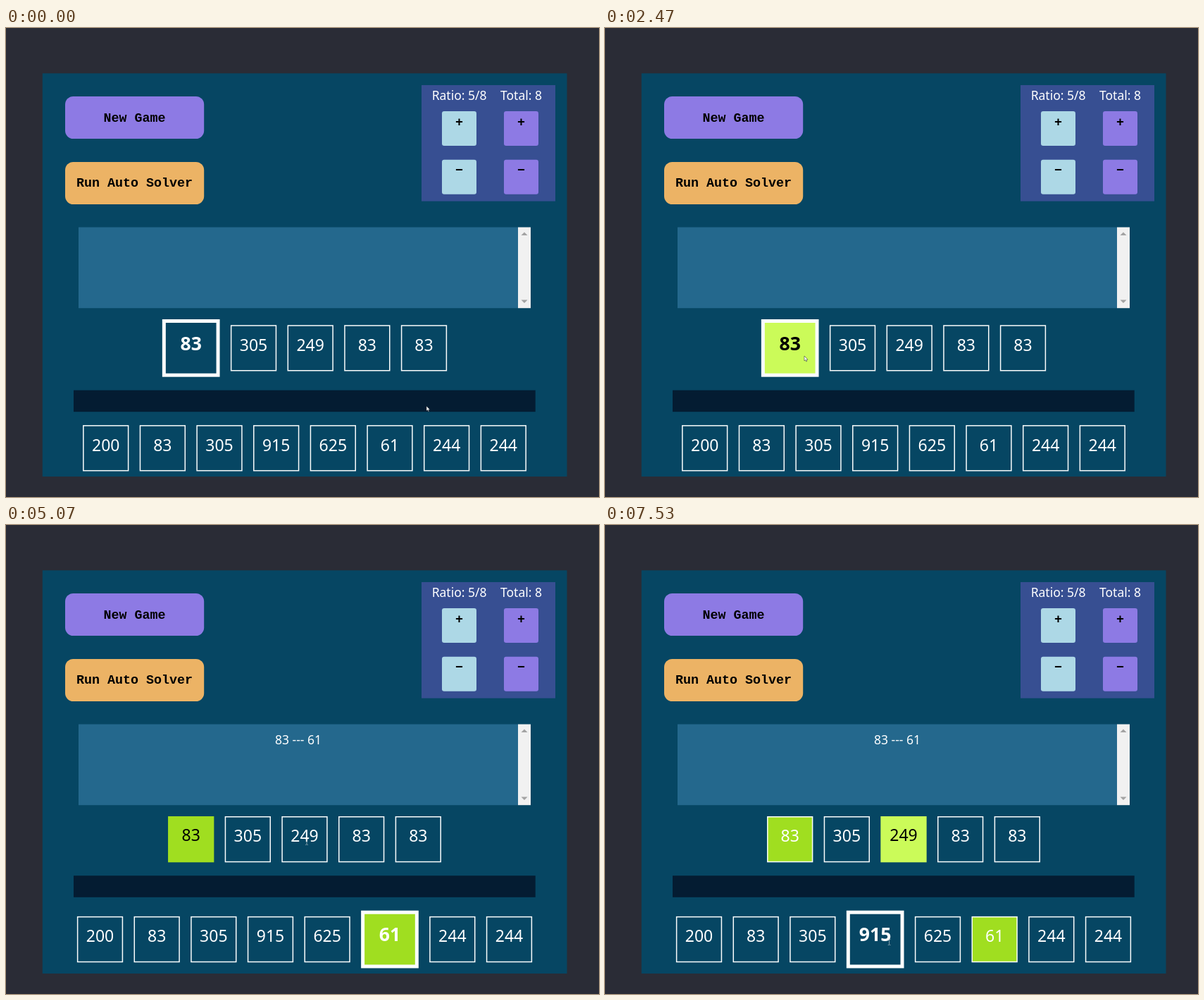
Animation of 842x665 px, one loop 8000 ms. Source, as an HTML page:

```html
<!DOCTYPE html>
<html lang="en">
<head>
<meta charset="utf-8">
<title>Number matching game</title>
<style>
  html, body { margin: 0; width: 100%; height: 100%; overflow: hidden; background: #2a2c36; }
  svg { display: block; width: 842px; height: 665px; }
  text { text-anchor: middle; font-family: "Noto Sans", "Open Sans", sans-serif; fill: #fff; }
  .mono { font: bold 18.33px "Liberation Mono", monospace; fill: #000; }
  .head { font-size: 17.5px; }
  .num { font-size: 23px; }
  .big { font-size: 26.6px; font-weight: bold; }
  .dark { fill: #000; }
</style>
</head>
<body>
<svg viewBox="0 0 842 665">
  <rect width="842" height="665" fill="#2a2c36"/>
  <rect x="51.8" y="64.3" width="744.7" height="571.7" fill="#064663"/>
  <rect x="84" y="97" width="197.2" height="60" rx="11.5" fill="#8d7ae4"/>
  <text class="mono" x="182.4" y="132.5">New Game</text>
  <rect x="84" y="190" width="197.2" height="60" rx="11.5" fill="#ecb365"/>
  <text class="mono" x="182.4" y="224.7">Run Auto Solver</text>

  <rect x="590" y="81" width="190" height="164.6" fill="#374f92"/>
  <text class="head" x="643.6" y="102">Ratio: 5/8</text>
  <text class="head" x="731.5" y="102">Total: 8</text>
  <g id="steppers"></g>

  <rect x="103" y="282.5" width="624" height="114.7" fill="#24688d"/>
  <rect x="727" y="282.5" width="18" height="114.7" fill="#f1f1f1"/>
  <path d="M731.5 294l4.5-4.5 4.5 4.5zM731.5 385.5l4.5 4.5 4.5-4.5z" fill="#a3a3a3"/>
  <text id="log" class="head" x="415" y="310.5"></text>

  <rect id="bar" x="96" width="655.7" height="30.6" fill="#041c32"/>
  <g id="tiles"></g>
  <path id="arrow" d="M0 0V7L1.6 5.6 2.7 8 3.8 7.5 2.8 5.2H5Z" fill="#fff" stroke="#111a22" stroke-width=".5"/>
  <path id="beam" d="M-1.8-4H-.5M.5-4H1.8M0-3.8V3.8M-1.8 4H-.5M.5 4H1.8" fill="none" stroke="#c3ccd0" stroke-width=".9" opacity=".75"/>
</svg>
<script>
const $ = id => document.getElementById(id);
const LOOP = 8000, FPS = 15;
const MID = 424, SMALL = 65.3, BIG = 81.7, GAP = 15.35, GROW = BIG - SMALL;
const LIME = "#cbfb59", GREEN = "#a0de20";
const rows = {
  top: [83, 305, 249, 83, 83],
  low: [200, 83, 305, 915, 625, 61, 244, 244]
};

const clicks = [
  { at: 0, row: "top", i: 0 },
  { at: 2467, row: "top", i: 0, fill: LIME },
  { at: 4200, row: "low", i: 5, fill: GREEN },
  { at: 5800, row: "top", i: 2, fill: LIME },
  { at: 7533, row: "low", i: 3 }
];

// pointer glides: start, end, x, y
const glides = [
  [133, 1000, 351, 451], [1000, 1267, 326, 465], [1600, 1733, 290, 465],
  [2000, 2200, 283, 465], [2667, 3600, 551, 587], [4400, 4533, 538.5, 583],
  [4600, 4933, 429, 457], [5000, 5067, 427, 449.5], [6067, 6733, 415, 540],
  [6800, 7200, 403.6, 591.5]
];

// Replays the clicks: a green answer also paints and logs its question.
function gameAt(ms) {
  const game = { fills: { top: {}, low: {} }, log: "" };
  for (const { at, row, i, fill } of clicks) {
    if (at > ms) break;
    game.row = row;
    game.pick = i;
    if (fill) game.fills[row][i] = fill;
    if (row === "top") game.asked = fill ? i : -1;
    else if (fill) {
      game.fills.top[game.asked] = fill;
      game.log = `${rows.top[game.asked]} --- ${rows.low[i]}`;
    }
  }
  return game;
}

function layRow(name, y, game) {
  const nums = rows[name], active = game.row === name;
  let x = MID - (nums.length * (SMALL + GAP) - GAP + (active ? GROW : 0)) / 2;
  return nums.map((n, i) => {
    const big = active && i === game.pick;
    const asked = name === "top" && i === game.asked;
    const size = big ? BIG : SMALL;
    const top = y + (active && !big ? GROW / 2 : 0);
    const line = big ? 5 : asked ? 0 : 1.5;
    const tile = {
      n, x, top, size, line, big, asked, fill: game.fills[name][i] || "none",
      cx: x + size / 2, base: top + (big ? 43.5 : 34.9 + line)
    };
    x += size + GAP;
    return tile;
  });
}

function tileMarkup({ n, x, top, size, line, big, asked, fill, cx, base }) {
  const inner = size - line;
  return `<rect x="${x + line / 2}" y="${top + line / 2}" width="${inner}" height="${inner}" fill="${fill}" stroke="#fbfdfd" stroke-width="${line}"/>` +
    `<text class="${big ? "big" : "num"}${asked ? " dark" : ""}" x="${cx}" y="${base}">${n}</text>`;
}

function pointerAt(ms) {
  let x = 597, y = 536;
  for (const [from, to, tx, ty] of glides) {
    const u = Math.min(1, Math.max(0, (ms - from) / (to - from)));
    const ease = u * u * (3 - 2 * u);
    x += (tx - x) * ease;
    y += (ty - y) * ease;
  }
  return [x, y];
}

function draw(time) {
  const ms = Math.floor((time + 4) * FPS / 1000) * 1000 / FPS + 1;
  const game = gameAt(ms);
  const shift = game.row === "top" ? GROW : 0;
  const tiles = [...layRow("top", 413, game), ...layRow("low", 546.7 + shift, game)];
  $("bar").setAttribute("y", 497.2 + shift);
  $("log").textContent = game.log;
  $("tiles").innerHTML = tiles.map(tileMarkup).join("");

  const [x, y] = pointerAt(ms);
  const overText = tiles.some(t =>
    Math.abs(x - t.cx) < String(t.n).length * (t.big ? 7.6 : 6.5) && Math.abs(y - t.base + 9) < 13);
  for (const id of ["arrow", "beam"]) {
    $(id).setAttribute("transform", `translate(${x} ${y})`);
    $(id).setAttribute("visibility", overText === (id === "beam") ? "visible" : "hidden");
  }
}

for (const [x, fill] of [[619, "#add8e6"], [707, "#8d7ae4"]])
  for (const [y, sign] of [[118, "+"], [186.7, "−"]])
    $("steppers").innerHTML += `<rect x="${x}" y="${y}" width="49" height="49" rx="3.2" fill="${fill}"/>` +
      `<text class="mono" x="${x + 24.5}" y="${y + 20.6}">${sign}</text>`;

const start = performance.now();
function tick() {
  draw((performance.now() - start) % LOOP);
  requestAnimationFrame(tick);
}
tick();
</script>
</body>
</html>
```
